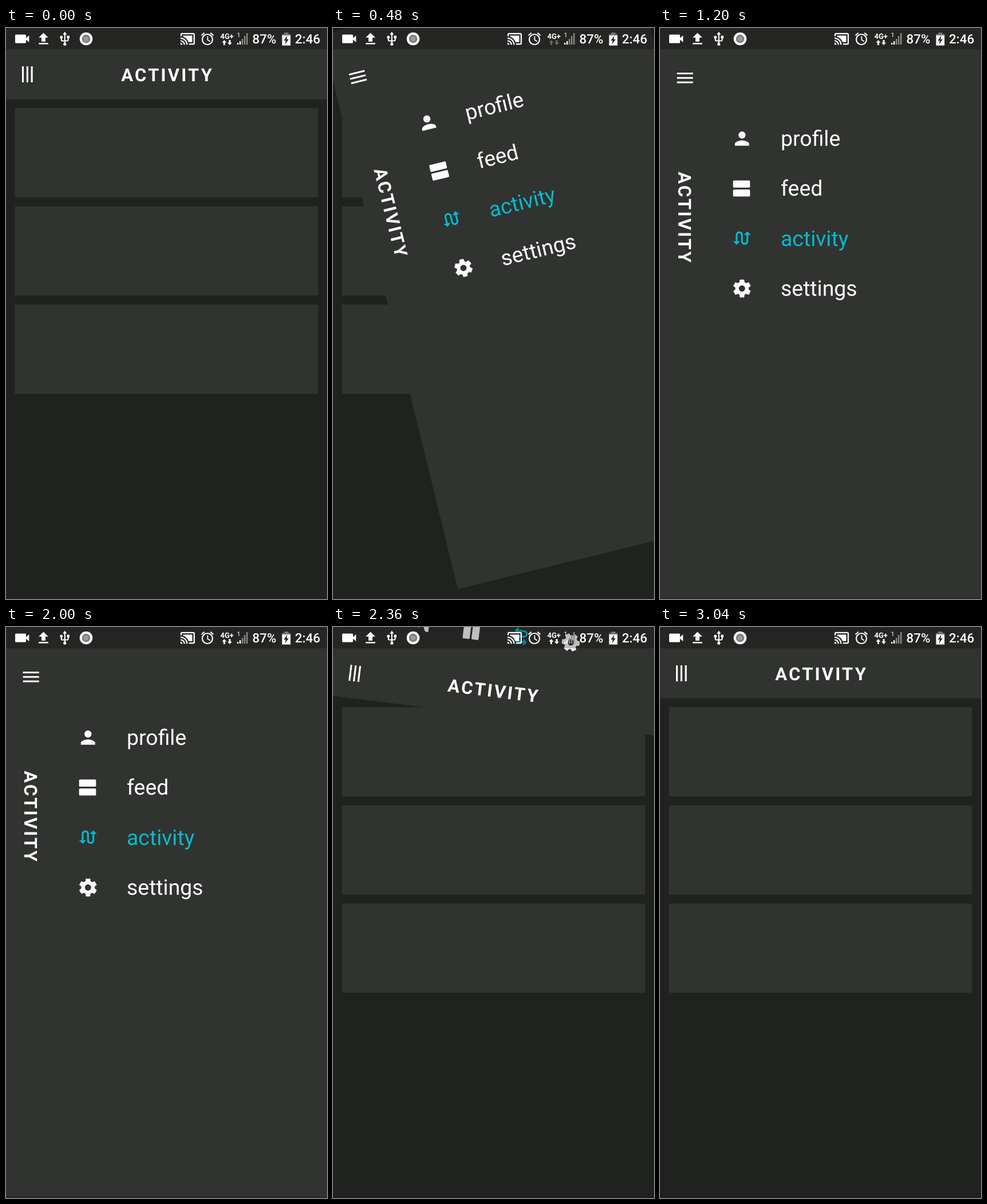
An HTML page that plays this animation: 561x998 px, repeating every 3080 ms.

```html
<!DOCTYPE html>
<html lang="en">
<head>
<meta charset="utf-8">
<title>Swinging menu</title>
<style>
  html, body { margin: 0; height: 100%; overflow: hidden; background: #20221f; }
  svg { display: block; width: 100vw; height: 100vh; fill: #fdfdfd;
        font-family: Roboto, sans-serif; text-rendering: geometricPrecision; }
  .panel { fill: #313330; }
  .item { font-size: 37.4px; }
  .active { fill: #08b9d0; }
  .title { font-size: 31.16px; font-weight: 700; letter-spacing: 3.116px; }
  .line { fill: none; stroke: #fdfdfd; }
</style>
</head>
<body>
<svg viewBox="0 0 561 998" preserveAspectRatio="none">
  <defs>
    <path id="tooth" d="M-3-6L-2.5-9.6Q-2.4-10-2-10H2Q2.4-10 2.5-9.6L3-6z"/>
  </defs>
  <rect width="561" height="998" fill="#20221f"/>
  <g class="panel">
    <rect x="15.6" y="140.2" width="529.8" height="155.8"/>
    <rect x="15.6" y="311.8" width="529.8" height="155.8"/>
    <rect x="15.6" y="483.4" width="529.8" height="155.8"/>
  </g>

  <g id="menu">
    <rect class="panel" width="561" height="998"/>
    <path d="M29.7 77.9h28v3.1h-28zm0 7.8h28v3.1h-28zm0 7.8h28v3.1h-28z"/>
    <text class="title" transform="translate(32 251.2) rotate(90)">ACTIVITY</text>
    <g class="item">
      <text x="211" y="206">profile</text>
      <text x="211" y="293.4">feed</text>
      <text x="211" y="380.9" class="active">activity</text>
      <text x="211" y="468.3">settings</text>
    </g>
    <!-- icons on a 24-unit grid, centred on the origin -->
    <g transform="translate(143.3 193.3) scale(1.558)">
      <circle cy="-4" r="4"/>
      <path d="M0 2c-2.67 0-8 1.34-8 4v2h16v-2c0-2.66-5.33-4-8-4z"/>
    </g>
    <g transform="translate(143.3 280.6) scale(1.558)">
      <rect x="-10" y="-9" width="19" height="8" rx="1"/>
      <rect x="-10" y="1" width="19" height="8" rx="1"/>
    </g>
    <path class="active" transform="translate(143.3 368) scale(1.558) translate(-12 -12)"
      d="M18 4l-4 4h3v7c0 1.1-.9 2-2 2s-2-.9-2-2V8c0-2.21-1.79-4-4-4S5 5.79 5 8v7H2l4 4 4-4H7V8c0-1.1.9-2 2-2s2 .9 2 2v7c0 2.21 1.79 4 4 4s4-1.79 4-4V8h3l-4-4z"/>
    <g transform="translate(143.3 455.3) scale(1.558)">
      <circle r="5.5" class="line" stroke-width="4"/>
      <use href="#tooth"/>
      <use href="#tooth" transform="rotate(60)"/>
      <use href="#tooth" transform="rotate(120)"/>
      <use href="#tooth" transform="rotate(180)"/>
      <use href="#tooth" transform="rotate(240)"/>
      <use href="#tooth" transform="rotate(300)"/>
    </g>
  </g>

  <rect width="561" height="37.4" fill="#000" opacity=".25"/>
  <rect y="995" width="561" height="3" fill="#2a1432" opacity=".35"/>

  <g id="status">
    <rect x="16" y="11.5" width="19" height="15" rx="1.5"/>
    <path d="M34 18.5l6.3-5.5v12l-6.3-5.5z"/>
    <path d="M65.5 8.5l8.3 8.3H69v7h-7v-7h-4.8zM57.2 26h16.6v2.4H57.2z"/>
    <g transform="translate(102.8 19)">
      <path d="M0-12.5l3.6 5h-7.2z"/>
      <path d="M0-9V9M-6-3V1.5Q-6 3.5-4 3.5H4Q6 3.5 6-.5V-3" class="line" stroke-width="2.2"/>
      <circle cx="-6" cy="-3" r="2.5"/>
      <rect x="3.6" y="-5.5" width="4.6" height="4.6"/>
      <circle cy="9.2" r="2.6"/>
    </g>
    <circle cx="140" cy="19" r="11.3"/>
    <circle cx="140" cy="19" r="7.2" fill="#777"/>
    <circle cx="140" cy="19" r="4.6" fill="#999"/>
    <path transform="translate(317.5 19) scale(1.14) translate(-12 -12)"
      d="M1 18v3h3c0-1.66-1.34-3-3-3zm0-4v2c2.76 0 5 2.24 5 5h2c0-3.87-3.13-7-7-7zm18-7H5v1.63c3.96 1.28 7.09 4.41 8.37 8.37H19V7zM1 10v2c4.97 0 9 4.03 9 9h2c0-6.08-4.93-11-11-11zm20-7H3c-1.1 0-2 .9-2 2v3h2V5h18v14h-7v2h7c1.1 0 2-.9 2-2V5c0-1.1-.9-2-2-2z"/>
    <g class="line" stroke-width="2.2" transform="translate(352 20)">
      <circle r="9"/>
      <path d="M-10.5-7l5.2-4.4M10.5-7l-5.2-4.4"/>
      <path d="M.4-5.6V.8L4.8 3.4" stroke-width="1.8"/>
    </g>
    <text x="374.5" y="18.5" font-size="13" font-weight="700">4G+</text>
    <path id="arrows" d="M381.5 21l4 4.5h-2.5v4.5h-3v-4.5h-2.5zM391 30l4-4.5h-2.5V21h-3v4.5H387z"/>
    <text x="403.5" y="16" font-size="11">1</text>
    <path d="M404 26h2.4v3H404zM408 23h2.4v6H408z"/>
    <path d="M412 19h2.4v10H412zM416 14h2.4v15H416zM420 9h2.4v20H420z" fill="#8b8d8b"/>
    <g font-size="22.4" font-weight="500">
      <text x="430.5" y="27.3">87%</text>
      <text x="505" y="27.3">2:46</text>
    </g>
    <path d="M486.5 8h7v2.5h3.7v3h-14.7v-3h4z" fill="#777977"/>
    <rect x="482.5" y="13" width="14.7" height="17.6"/>
    <path d="M491.5 13.5l-6 8.5h3.4l-1.2 6.5 6.3-8.7h-3.5z" fill="#252624"/>
  </g>
</svg>
<script>
const LOOP = 3080, STEP = 40, TICK = 16.63, DURATION = 1000;
const OPEN_AT = 33, CLOSE_AT = 2005;
const menu = document.getElementById('menu');
const arrows = document.getElementById('arrows');

function bounceOut(p) {
  const k = 7.5625, d = 2.75;
  if (p < 1 / d) return k * p * p;
  if (p < 2 / d) return k * (p - 1.5 / d) ** 2 + 0.75;
  if (p < 2.5 / d) return k * (p - 2.25 / d) ** 2 + 0.9375;
  return k * (p - 2.625 / d) ** 2 + 0.984375;
}

// Progress advances once per display refresh.
function progress(t, start) {
  const elapsed = Math.floor((t - start) / TICK) * TICK;
  return Math.min(1, Math.max(0, elapsed / DURATION));
}

function draw(now) {
  const t = Math.floor((now % LOOP) / STEP) * STEP;
  const angle = t < CLOSE_AT
    ? -90 * (1 - bounceOut(progress(t, OPEN_AT)))
    : -90 * bounceOut(progress(t, CLOSE_AT));
  menu.setAttribute('transform', `rotate(${angle} 37.4 87.3)`);
  arrows.setAttribute('fill', t >= 40 && t < 1200 ? '#666866' : '#fdfdfd');
}

const start = performance.now();
function loop() {
  draw(performance.now() - start);
  requestAnimationFrame(loop);
}
loop();
</script>
</body>
</html>
```
